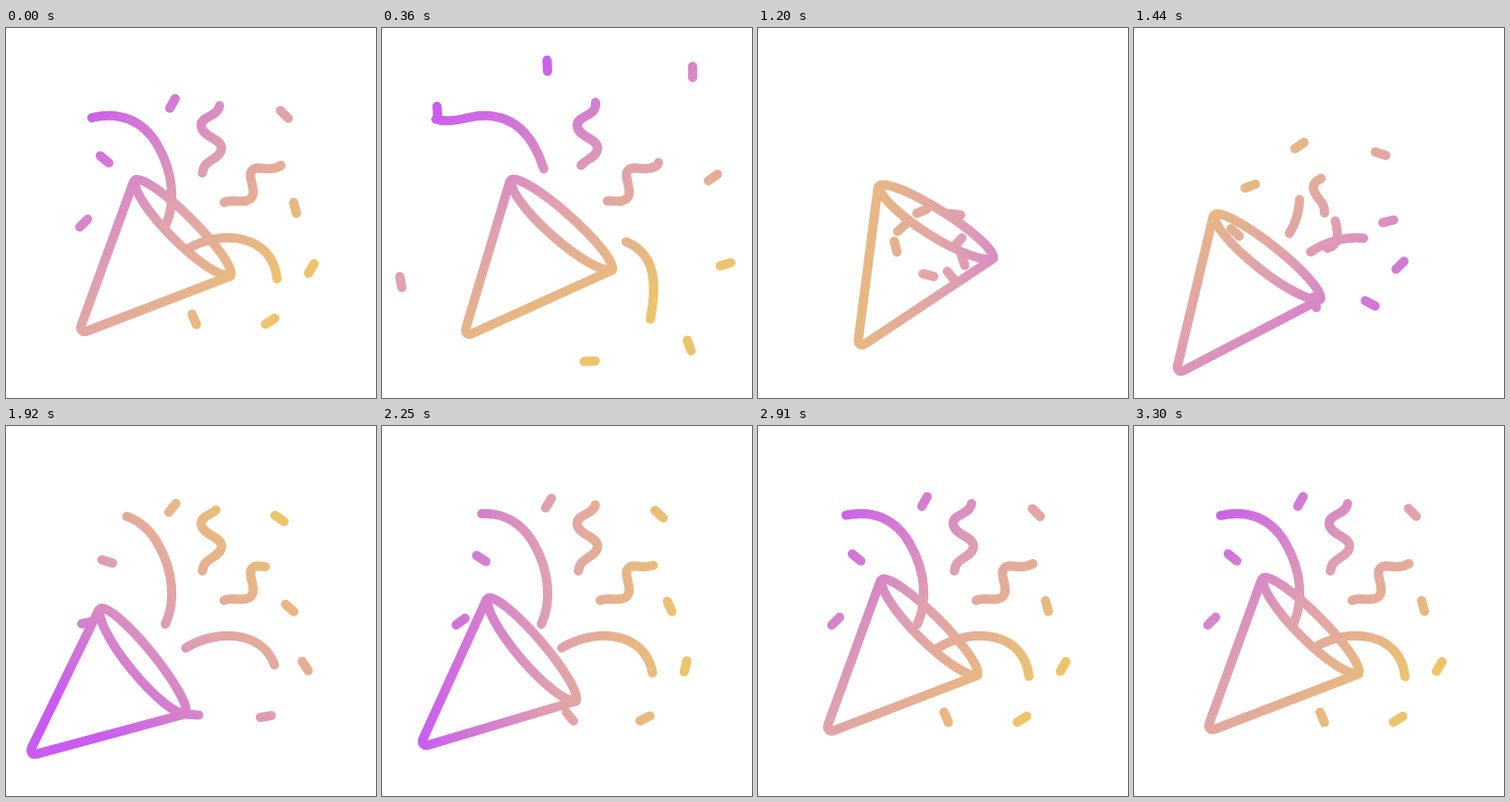
Write an HTML page that moves like this. It is 400x400 px and loops after 4330 ms.

```html
<!DOCTYPE html>
<html lang="en">
<head>
<meta charset="utf-8">
<title>Party popper</title>
<style>
  html, body { margin: 0; width: 100%; height: 100%; overflow: hidden; background: #fff; }
  svg { display: block; width: 100%; height: 100%; }
  .ink { fill: none; stroke: #fff; stroke-width: 10; stroke-linecap: round; stroke-linejoin: round; }
</style>
</head>
<body>
<svg viewBox="0 0 400 400">
  <defs>
    <linearGradient id="tint" gradientUnits="userSpaceOnUse" x1="35" y1="200" x2="325" y2="200">
      <stop offset="0" stop-color="#c95cf0"/>
      <stop offset=".5" stop-color="#dfa0b0"/>
      <stop offset="1" stop-color="#ecc46c"/>
    </linearGradient>
    <mask id="shape" maskUnits="userSpaceOnUse" x="0" y="0" width="400" height="400">
      <g id="ink" class="ink">
        <g id="cone">
          <path d="M138 166 L81.5 321 C79.5 326.5 83 329.5 88 327.5 L243 268"/>
          <path d="M140 164 A73 13.5 45 0 1 243 267 A73 17 45 0 1 140 164Z"/>
        </g>
      </g>
    </mask>
  </defs>
  <rect width="400" height="400" fill="url(#tint)" mask="url(#shape)"/>
</svg>
<script>
const LOOP = 4330, STEP = 30, LAST = 3300, BURST = 1110;
const ink = document.getElementById('ink');
const cone = document.getElementById('cone');
const tint = document.getElementById('tint');

// Share of the span from a to b that has passed at time t.
const part = (t, a, b) => Math.min(Math.max((t - a) / (b - a), 0), 1);
const glide = (t, a, b) => { const u = part(t, a, b); return u * u * (3 - 2 * u); };
const slowing = (t, a, b, power) => 1 - Math.pow(1 - part(t, a, b), power);
const settle = (t, start, tau) => 1 - Math.exp(-Math.max(t - start, 0) / tau);
const mix = (a, b, k) => a + (b - a) * k;

function addPath(d) {
  const el = document.createElementNS('http://www.w3.org/2000/svg', 'path');
  el.setAttribute('d', d);
  ink.append(el);
  return el;
}

// Leans back, is kicked away by the burst, then drifts home.
function poseCone(t) {
  const turn = -13.4 * glide(t, 0, 1100) + 19.4 * glide(t, 1100, 1950) - 6 * glide(t, 1950, 2850);
  const kick = glide(t, 1100, 1500);
  const x = -56 * (kick - slowing(t, 1500, LAST, 1.5));
  const y = 40 * (kick - glide(t, 1500, 3100));
  cone.setAttribute('transform', `translate(${x} ${y}) rotate(${turn} 140 164)`);
}

function poseTint(t) {
  const turn = 1 - Math.pow(1 - Math.pow(t / LAST, 1.85), 3);
  tint.setAttribute('gradientTransform', `rotate(${45 + 360 * turn} 200 200)`);
}

// A streamer shows a window of its path. It slides off the far end,
// then grows again from the near end to its resting window.
function streamer({ from, curves, rest, power, gone, born, tau }) {
  const el = addPath(from);
  const lengths = [0];
  let d = from;
  for (const c of curves) {
    d += ' C' + c;
    el.setAttribute('d', d);
    lengths.push(el.getTotalLength());
  }
  const total = lengths[curves.length];
  // Resting ends are counted in curves.
  const [tail, head] = rest.map(u => {
    const i = Math.min(Math.floor(u), curves.length - 1);
    return mix(lengths[i], lengths[i + 1], u - i);
  });
  return t => {
    const out = t < BURST;
    const a = out ? mix(tail, total, Math.pow(part(t, 0, gone), power)) : tail * glide(t, 1440, 1920);
    const b = out ? mix(head, total, Math.pow(part(t, 0, 810), power)) : head * settle(t, born, tau);
    el.style.display = b - a > 0.5 ? '' : 'none';
    el.setAttribute('stroke-dasharray', `${Math.max(b - a, 0)} 2000`);
    el.setAttribute('stroke-dashoffset', -a);
  };
}

const streamers = [
  {
    from: 'M168 222',
    curves: ['184 197 183 160 164 127', '148 99 122 90 93 97', '76 101 66 101 60 99',
      '48 97 42 94 38 90', '25 75 24 40 57 38'],
    rest: [0.09, 2], power: 1.6, gone: 955, born: 1355, tau: 360
  },
  {
    from: 'M191 242',
    curves: ['230 216 288 222 293 271', '295 285 293 298 291 309',
      '286 352 246 362 237 334', '232 325 232 321 237 311'],
    rest: [0.03, 1], power: 1.5, gone: 870, born: 1257, tau: 290
  },
  {
    from: 'M206 200',
    curves: ['207 186 194 184 194 172', '194 165 200 165 203 162', '208 159 212 161 213 154',
      '214 143 233 141 233 130', '233 119 211 118 211 105', '211 95 231 96 231 82',
      '231 73 220 72 214 69'],
    rest: [2.8, 5.92], power: 2.5, gone: 1060, born: 1378, tau: 185
  },
  {
    from: 'M209 238',
    curves: ['221 236 222 222 217 207', '215 199 229 203 231 195', '235 182 252 189 259 187',
      '277 183 259 161 266 154', '272 147 282 157 297 149', '301 145 299 134 296 125'],
    rest: [2.25, 5], power: 2.5, gone: 1060, born: 1379, tau: 245
  }
].map(streamer);

// Confetti flies outwards, then bursts from the cone's mouth and spins into place.
const MOUTH = { x: 176, y: 247 };

function confetti({ at: [x, y], angle, fly: [dx, dy], spin, turn }) {
  const el = addPath('M-6 0H6');
  return t => {
    let px, py, a;
    if (t < BURST) {
      const k = 1.03 * slowing(t, 0, 1080, 2.5);
      px = x + dx * k;
      py = y + dy * k;
      a = angle + spin * part(t, 0, 810);
    } else {
      const k = settle(t, BURST, 256);
      px = mix(MOUTH.x, x, k);
      py = mix(MOUTH.y, y, k);
      a = angle + turn * Math.pow(Math.max(2500 - t, 0) / 1060, 1.6);
    }
    el.setAttribute('transform', `translate(${px} ${py}) rotate(${a})`);
  };
}

const pieces = [
  { at: [180, 81.5], angle: -61, fly: [-2, -62], spin: -71, turn: 27 },
  { at: [301, 93.5], angle: 45, fly: [53, -70], spin: 100, turn: -27 },
  { at: [106.5, 142], angle: 39, fly: [-71, -78], spin: 104, turn: -59 },
  { at: [84, 211], angle: -45, fly: [-97, 97], spin: -125, turn: 87 },
  { at: [312.5, 194.5], angle: 75, fly: [69, -50], spin: 157, turn: -89 },
  { at: [330, 260], angle: -60, fly: [63, -7], spin: 98, turn: -165 },
  { at: [285.5, 317], angle: -32, fly: [71, 40], spin: -176, turn: 60 },
  { at: [203.5, 315], angle: 67, fly: [32, 69], spin: -157, turn: -168 }
].map(confetti);

const movers = [poseCone, poseTint, ...streamers, ...pieces];
const begin = performance.now();

function frame() {
  const t = (performance.now() - begin) % LOOP;
  const shown = Math.min(Math.floor(t / STEP) * STEP, LAST);
  for (const move of movers) move(shown);
  requestAnimationFrame(frame);
}
frame();
</script>
</body>
</html>
```
